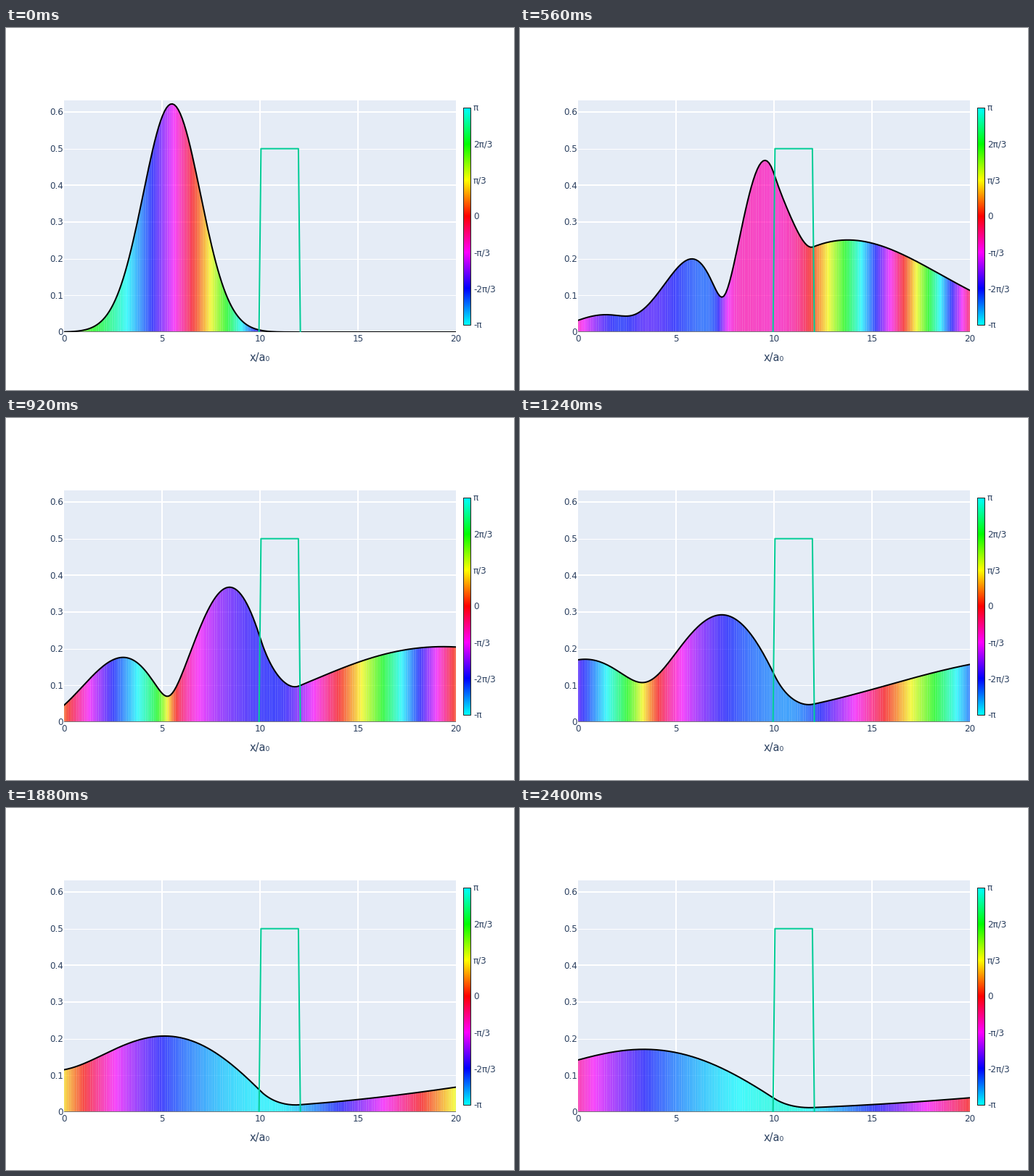
These frames come from a looping animation (700x500 px, 2440 ms). A matplotlib script:

```python
import numpy as np
import matplotlib.pyplot as plt
from matplotlib.animation import FuncAnimation
from matplotlib.collections import PolyCollection
from matplotlib.colors import hsv_to_rgb
from matplotlib.patches import Rectangle

W, H, DPI = 700, 500, 100
FRAMES, INTERVAL = 61, 40
PX = 72 / DPI                       # points per pixel
INK, PLOT_BG, TEAL = "#2a3f5f", "#e5ecf6", "#00cc96"

# Wave packet hitting a square barrier, in atomic units
POINTS = 200
DX = 20 / (POINTS - 1)
PAD, N = 1400, 3072                 # wide domain, so nothing wraps into view
X0, K0, SIGMA = 5.0, 1.0, 1.0
BARRIER, LEFT, RIGHT = 0.5, 10, 12
DT, STEPS = 0.01, 50
TOP = (2 * np.pi * SIGMA**2) ** -0.25


def simulate():
    """Split-step evolution; returns the visible part for every frame."""
    x = (np.arange(N) - PAD) * DX
    k = 2 * np.pi * np.fft.fftfreq(N, DX)
    v = np.where((x >= LEFT) & (x <= RIGHT), BARRIER, 0.0)
    half_v = np.exp(-0.5j * v * DT)
    kinetic = np.exp(-0.5j * k**2 * DT)
    psi = TOP * np.exp(-((x - X0) ** 2) / (4 * SIGMA**2) + 1j * K0 * x)
    out = []
    for _ in range(FRAMES):
        for _ in range(STEPS):
            psi = half_v * np.fft.ifft(kinetic * np.fft.fft(half_v * psi))
        out.append(psi[PAD:PAD + POINTS].copy())
    return out


def phase_rgb(phase):
    hue = np.mod(phase / (2 * np.pi), 1)
    return hsv_to_rgb(np.stack([hue, np.ones_like(hue), np.ones_like(hue)], -1))


def add_axes(left, top, width, height):
    """Axes placed in pixels, measured from the top left corner."""
    ax = fig.add_axes([left / W, 1 - (top + height) / H, width / W, height / H])
    ax.set_xticks([])
    ax.set_yticks([])
    for spine in ax.spines.values():
        spine.set_visible(False)
    return ax


def label(x, baseline, text, ha, size=12):
    fig.text(x / W, 1 - baseline / H, text, ha=ha, va="baseline",
             fontsize=size * PX, color=INK, family="DejaVu Sans")


waves = simulate()
x = np.arange(POINTS) * DX
edges = np.concatenate([[0], (x[1:] + x[:-1]) / 2, [20]])

fig = plt.figure(figsize=(W / DPI, H / DPI), dpi=DPI, facecolor="white")
ax = add_axes(80, 100, 540, 320)
ax.set_facecolor(PLOT_BG)
ax.set_xlim(0, 20)
ax.set_ylim(0, TOP)

# Grid and tick labels
for tick in range(0, 21, 5):
    if 0 < tick < 20:
        ax.axvline(tick, color="white", lw=2 * PX, zorder=0.5)
    label(80 + 27 * tick, 433, str(tick), "center")
for i in range(7):
    value = i / 10
    if i:
        width = 2 if i in (3, 4, 6) else 1
        ax.axhline(value, color="white", lw=width * PX, zorder=0.5)
    label(79, 424.4 - 320 * value / TOP, f"{value:g}", "right")
label(350, 460, "x/a₀", "center", 14.5)

# Phase scale
bar = add_axes(630, 110, 10, 300)
scale = phase_rgb(np.linspace(np.pi, -np.pi, 300))
bar.imshow(scale[:, None, :], aspect="auto", extent=(0, 1, 0, 1),
           interpolation="nearest")
bar.add_patch(Rectangle((0, 0), 1, 1, fill=False, ec="#222222", lw=PX,
                        clip_on=False))
for i, text in enumerate(["π", "2π/3", "π/3", "0", "-π/3", "-2π/3", "-π"]):
    label(644, 114.4 + 50 * i, text, "left")

# Moving parts
fill = PolyCollection([], alpha=0.7, edgecolors="none", linewidths=0,
                      snap=False, zorder=2)
ax.add_collection(fill, autolim=False)
ax.axhline(0, color="#777777", lw=2 * PX, zorder=2.5)
curve, = ax.plot([], [], color="black", lw=2 * PX, zorder=3)
first, last = np.flatnonzero((x >= LEFT) & (x <= RIGHT))[[0, -1]]
ax.plot(x[[first - 1, first, last, last + 1]], [0, BARRIER, BARRIER, 0],
        color=TEAL, lw=2 * PX, zorder=4)


def update(n):
    psi = waves[n]
    height = np.abs(psi)
    tops = np.interp(edges, x, height)
    zero = np.zeros(POINTS)
    left, right = edges[:-1], edges[1:]
    verts = np.stack([
        np.column_stack([left, zero]),
        np.column_stack([left, tops[:-1]]),
        np.column_stack([x, height]),
        np.column_stack([right, tops[1:]]),
        np.column_stack([right, zero]),
    ], axis=1)
    fill.set_verts(verts)
    fill.set_facecolor(phase_rgb(np.angle(psi)))
    curve.set_data(x, height)
    return fill, curve


anim = FuncAnimation(fig, update, frames=FRAMES, interval=INTERVAL,
                     repeat=True, repeat_delay=0, blit=False)
plt.show()
```
